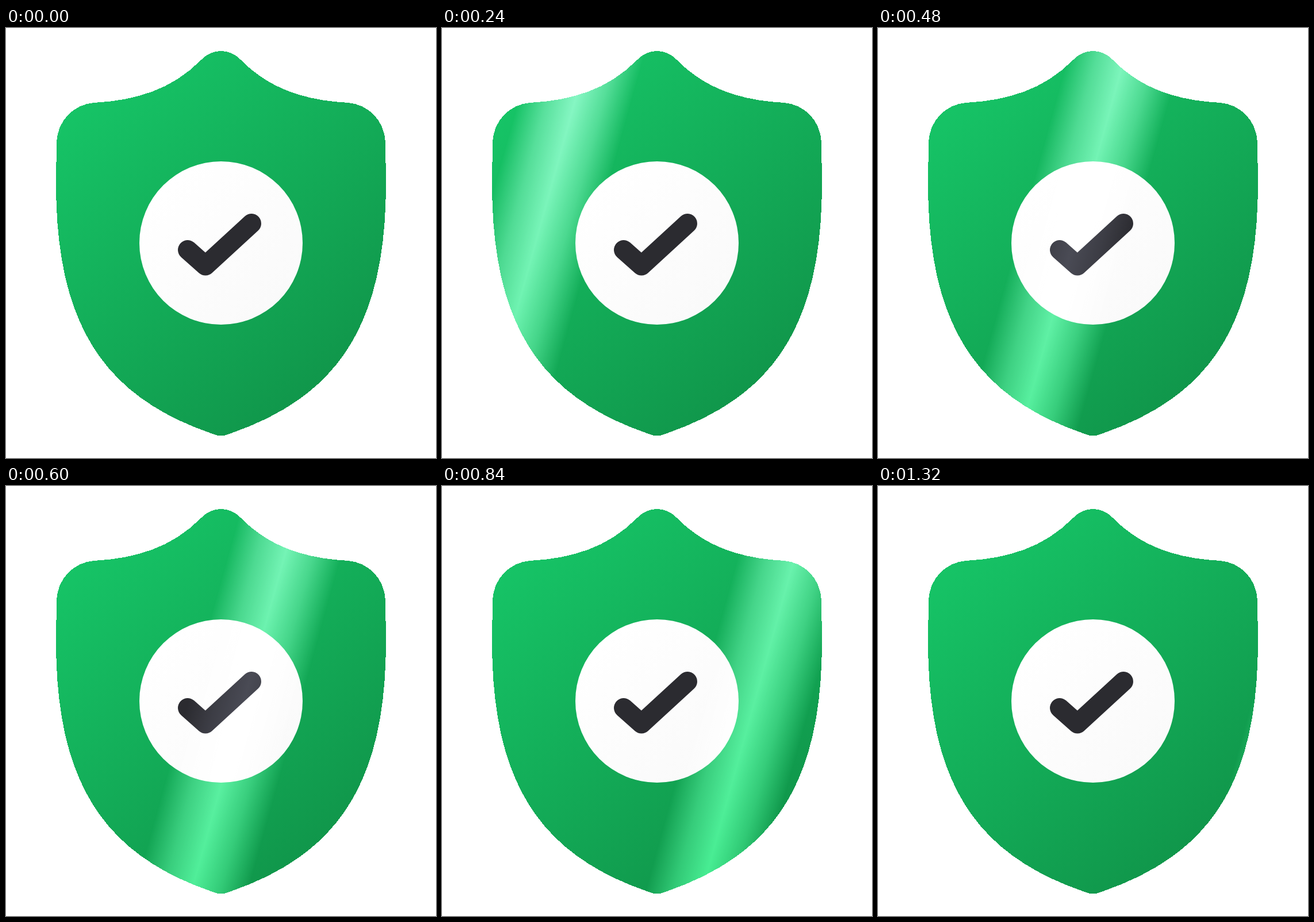
Write an HTML page that moves like this. It is 748 px wide and 748 px high and loops after 1550 ms.

```html
<!DOCTYPE html>
<html lang="en">
<head>
<meta charset="utf-8">
<title>Shield check</title>
<style>
  html, body { margin: 0; width: 100%; height: 100%; overflow: hidden; background: #fff; }
  svg { display: block; width: 100%; height: 100%; }
  .check { fill: none; stroke-width: 34; stroke-linecap: round; stroke-linejoin: round; }

  .sweep { animation: sweep 1550ms infinite; }
  @keyframes sweep {
    0% { transform: translateX(-57px); animation-timing-function: cubic-bezier(.333, .552, .667, .788); }
    85.161%, 100% { transform: translateX(749px); }
  }
</style>
</head>
<body>
<svg viewBox="0 0 748 748">
  <defs>
    <linearGradient id="green" gradientUnits="userSpaceOnUse" x1="88" y1="40" x2="660" y2="709">
      <stop offset="0" stop-color="rgb(23,202,106)"/>
      <stop offset="1" stop-color="rgb(15,141,69)"/>
    </linearGradient>
    <linearGradient id="mint" gradientUnits="userSpaceOnUse" x1="88" y1="40" x2="660" y2="709">
      <stop offset="0" stop-color="rgb(152,249,209)"/>
      <stop offset="1" stop-color="rgb(54,234,133)"/>
    </linearGradient>
    <linearGradient id="paper" gradientUnits="userSpaceOnUse" x1="274" y1="274" x2="474" y2="474">
      <stop offset="0" stop-color="#fff"/>
      <stop offset="1" stop-color="#fafafa"/>
    </linearGradient>
    <linearGradient id="glow">
      <stop offset="0" stop-color="#fff" stop-opacity="0"/>
      <stop offset=".25" stop-color="#fff" stop-opacity=".58"/>
      <stop offset=".5" stop-color="#fff"/>
      <stop offset=".75" stop-color="#fff" stop-opacity=".58"/>
      <stop offset="1" stop-color="#fff" stop-opacity="0"/>
    </linearGradient>

    <path id="shield" shape-rendering="crispEdges" d="M340 55C359 35 389 35 408 55C458 106 520 126 595 130
      C630 133 658 160 660 198C660 220 661 250 661 270C661 517 577 641 390 705.5
      C380 710.5 368 710.5 358 705.5C171 641 87 517 87 270C87 250 88 220 88 198
      C90 160 118 133 153 130C228 126 290 106 340 55Z"/>
    <circle id="disc" cx="374" cy="374" r="142"/>
    <path id="tick" class="check" d="M316 386L347 413.5L427 340"/>

    <mask id="band" maskUnits="userSpaceOnUse" x="0" y="0" width="748" height="748">
      <g class="sweep">
        <g transform="translate(0 374) skewX(-15.5)">
          <rect x="-99" y="-374" width="198" height="748" fill="url(#glow)"/>
        </g>
      </g>
    </mask>
  </defs>

  <use href="#shield" fill="url(#green)"/>
  <use href="#disc" fill="url(#paper)"/>
  <use href="#tick" stroke="#2b2b30"/>

  <g mask="url(#band)">
    <use href="#shield" fill="url(#mint)"/>
    <use href="#disc" fill="#fff"/>
    <use href="#tick" stroke="#4a4b55"/>
  </g>
</svg>
</body>
</html>
```
